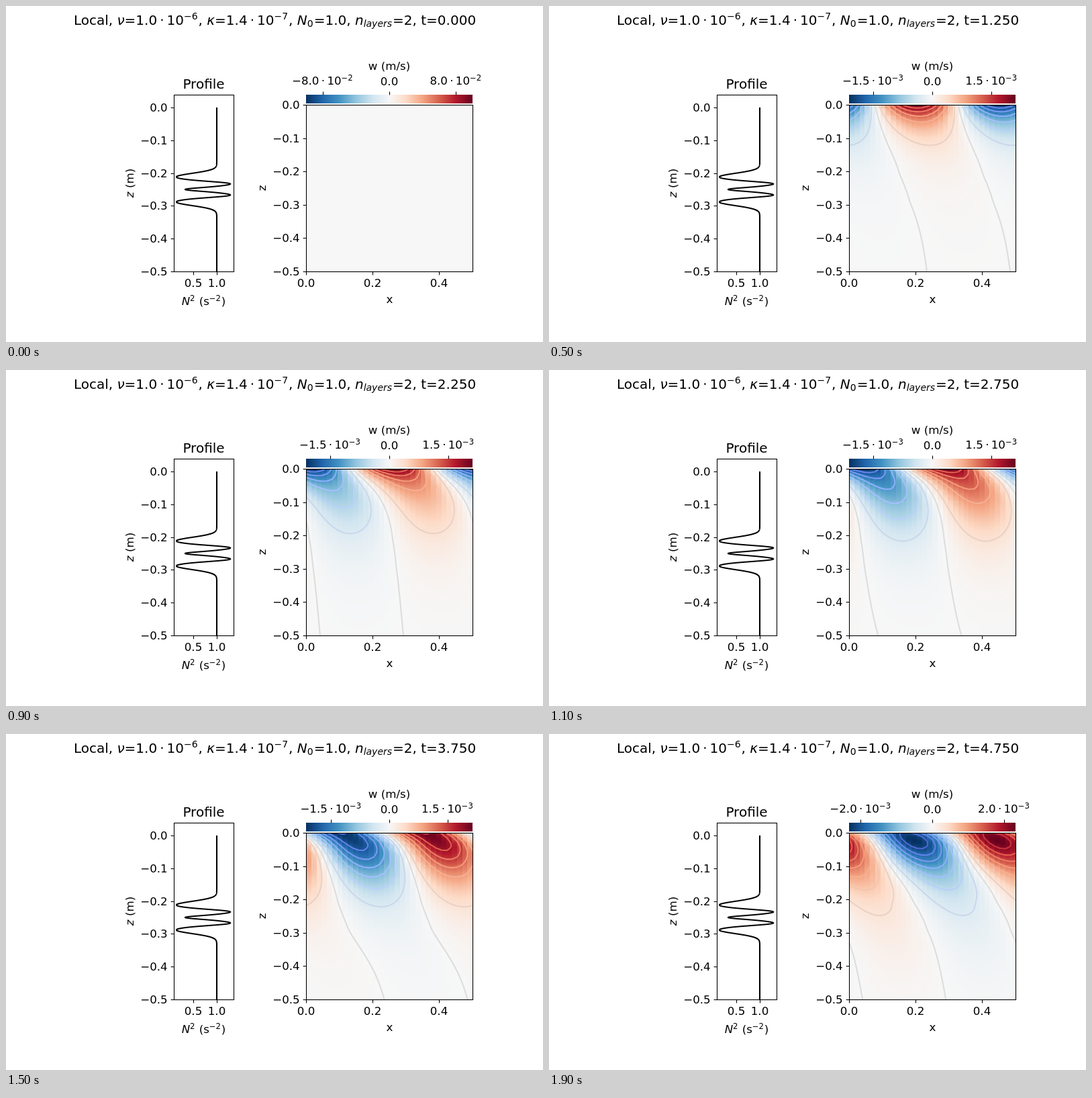
Animation, 800 px wide and 500 px high, one loop 2 s. Source, as an HTML page with a canvas:

```html
<!DOCTYPE html>
<html lang="en">
<head>
<meta charset="utf-8">
<title>Internal wave field</title>
<style>
  html, body { margin: 0; width: 100%; height: 100%; overflow: hidden; background: #fff; }
  canvas { display: block; }
</style>
</head>
<body>
<canvas id="stage" width="800" height="500"></canvas>
<script>
const ctx = document.getElementById('stage').getContext('2d');
const FRAMES = 20, FRAME_MS = 100, FRAME_DT = 0.25;
const K = 4 * Math.PI, OMEGA = 0.78;
const COLS = 32, ROWS = 128;
const MAP = { x: 447, y: 147, size: 248 };
const SMALL = 16.67, LARGE = 20;

const RD_BU = ['053061', '2166ac', '4393c3', '92c5de', 'd1e5f0', 'f7f7f7',
  'fddbc7', 'f4a582', 'd6604d', 'b2182b', '67001f'].map(parseHex);
const COOL_WARM = ['3b4cc0', '6282ea', '8db0fe', 'b8d0f9', 'dddddd',
  'f5c4ad', 'f49a7b', 'de604d', 'b40426'].map(parseHex);

function parseHex(hex) {
  return [0, 2, 4].map(i => parseInt(hex.slice(i, i + 2), 16));
}

function ramp(stops, u) {
  const p = Math.min(1, Math.max(0, u)) * (stops.length - 1);
  const i = Math.min(stops.length - 2, Math.floor(p));
  return stops[i].map((c, j) => Math.round(c + (stops[i + 1][j] - c) * (p - i)));
}

// Squared buoyancy frequency at height z.
function stratification(z) {
  const u = Math.abs(z + 0.25);
  const bump = (centre, width) => Math.exp(-(((u - centre) / width) ** 2));
  return 1 - 0.86 * bump(0.038, 0.016) + 0.46 * bump(0.0185, 0.008) - 0.67 * bump(0, 0.007);
}

// Linear waves below a moving boundary: (D² - k²) W = k² S, with S'' = N² W.
function simulate(forcing) {
  const n = 2 * ROWS, dz = 0.5 / ROWS, perFrame = 25, dt = FRAME_DT / perFrame;
  const n2 = Array.from({ length: n + 1 }, (_, j) => stratification(-j * dz));
  const W = new Float64Array(n + 1), S = new Float64Array(n + 1), V = new Float64Array(n + 1);
  const c = new Float64Array(n + 1), d = new Float64Array(n + 1);
  const diagonal = -2 - (K * dz) ** 2, saved = [];
  for (let step = 0; step < FRAMES * perFrame; step++) {
    c[0] = 0;
    d[0] = forcing(step * dt);
    for (let j = 1; j < n; j++) {
      const pivot = diagonal - c[j - 1];
      c[j] = 1 / pivot;
      d[j] = ((K * dz) ** 2 * S[j] - d[j - 1]) / pivot;
    }
    W[0] = d[0];
    for (let j = n - 1; j > 0; j--) W[j] = d[j] - c[j] * W[j + 1];
    if (step % perFrame === 0) saved.push(W.slice(0, ROWS + 1));
    for (let j = 0; j <= n; j++) {
      V[j] += dt * n2[j] * W[j];
      S[j] += dt * V[j];
    }
  }
  return saved;
}

const inPhase = simulate(t => Math.cos(OMEGA * t));
const quadrature = simulate(t => Math.sin(OMEGA * t));

function peakSpeed(frame) {
  if (frame === 0) return 0.1;
  const late = Math.max(0, frame * FRAME_DT - 3.1) / 1.65;
  return 2.11e-3 + 0.21e-3 * late * late;
}

// Returns w(column, row); the column may be fractional.
function makeField(frame) {
  const a = inPhase[frame], b = quadrature[frame];
  const scale = peakSpeed(frame) / Math.max(...a.map((v, j) => Math.hypot(v, b[j])));
  return (col, row) => {
    const angle = 2 * Math.PI * col / COLS;
    return scale * (a[row] * Math.sin(angle) - b[row] * Math.cos(angle));
  };
}

function renderCells(field, vmax) {
  const cells = document.createElement('canvas');
  cells.width = COLS;
  cells.height = ROWS;
  const g = cells.getContext('2d'), image = g.createImageData(COLS, ROWS);
  for (let r = 0, p = 0; r < ROWS; r++) {
    for (let c = 0; c < COLS; c++, p += 4) {
      const w = field(c + 0.5, r);
      image.data.set([...ramp(RD_BU, 0.5 + w / vmax / 2), 255], p);
    }
  }
  g.putImageData(image, 0, 0);
  return cells;
}

function contourPath(field, level) {
  const path = new Path2D(), dx = MAP.size / COLS, dy = MAP.size / ROWS;
  for (let r = 0; r < ROWS; r++) {
    for (let c = 0; c < COLS; c++) {
      const corners = [[c, r], [c + 1, r], [c + 1, r + 1], [c, r + 1]];
      const values = corners.map(([x, y]) => field(x, y) - level);
      const hits = [];
      for (let i = 0; i < 4; i++) {
        const j = (i + 1) % 4;
        if ((values[i] < 0) === (values[j] < 0)) continue;
        const f = values[i] / (values[i] - values[j]);
        hits.push([0, 1].map(k => corners[i][k] + (corners[j][k] - corners[i][k]) * f));
      }
      hits.forEach(([x, y], i) =>
        path[i % 2 ? 'lineTo' : 'moveTo'](MAP.x + x * dx, MAP.y + y * dy));
    }
  }
  return path;
}

function buildFrame(frame) {
  const vmax = peakSpeed(frame);
  if (frame === 0) return { vmax, cells: renderCells(() => 0, vmax), contours: [] };
  const field = makeField(frame), contours = [];
  for (let i = -7; i <= 7; i++) {
    const color = `rgb(${ramp(COOL_WARM, 0.5 + i / 16)})`;
    contours.push({ color, path: contourPath(field, i * 3e-4) });
  }
  return { vmax, cells: renderCells(field, vmax), contours };
}

const frames = Array.from({ length: FRAMES }, (_, i) => buildFrame(i));

// Markup: ~{italic} ^{superscript} _{subscript}
function text(markup, x, y, size = SMALL, align = 'center') {
  const runs = [...markup.matchAll(/([~^_])\{(.*?)\}|[^~^_{}]+/g)].map(m => {
    const kind = m[1] || '', content = m[2] ?? m[0], script = kind === '^' || kind === '_';
    const italic = kind === '~' || (kind === '_' && /[a-z]/.test(content));
    const font = `${italic ? 'italic ' : ''}${size * (script ? 0.7 : 1)}px "DejaVu Sans", sans-serif`;
    ctx.font = font;
    return {
      content, font,
      width: ctx.measureText(content).width + (script ? 0.05 * size : 0),
      shift: kind === '^' ? -0.383 * size : kind === '_' ? 0.164 * size : 0
    };
  });
  const total = runs.reduce((sum, run) => sum + run.width, 0);
  let left = x - (align === 'center' ? total / 2 : align === 'right' ? total : 0);
  ctx.fillStyle = '#000';
  for (const run of runs) {
    ctx.font = run.font;
    ctx.fillText(run.content, left, y + run.shift);
    left += run.width;
  }
}

function verticalText(markup, x, y) {
  ctx.save();
  ctx.translate(x, y);
  ctx.rotate(-Math.PI / 2);
  text(markup, 0, 0);
  ctx.restore();
}

function line(x1, y1, x2, y2) {
  ctx.beginPath();
  ctx.moveTo(x1, y1);
  ctx.lineTo(x2, y2);
  ctx.stroke();
}

function axes(x, y, w, h, xTicks, yTop, yStep) {
  ctx.strokeStyle = '#000';
  ctx.lineWidth = 1.1;
  ctx.strokeRect(x + 0.5, y + 0.5, w, h);
  for (const [label, tx] of xTicks) {
    line(tx + 0.5, 395.5, tx + 0.5, 400.4);
    text(label, tx, 418);
  }
  for (let i = 0; i < 6; i++) {
    const ty = Math.round(yTop + i * yStep);
    line(x - 4.4, ty + 0.5, x + 0.5, ty + 0.5);
    text((i ? '−' : '') + (i / 10).toFixed(1), x - 9.3, ty + 6, SMALL, 'right');
  }
}

function drawProfile() {
  axes(250, 132, 89, 263, [['0.5', 279], ['1.0', 314]], 151, 48.8);
  text('Profile', 294.5, 123, LARGE);
  text('~{N}^{2} (s^{−2})', 294.5, 445);
  verticalText('~{z} (m)', 190, 263.5);
  ctx.beginPath();
  for (let y = 151; y <= 395; y += 0.25) {
    ctx.lineTo(244 + 70 * stratification((151 - y) / 488), y);
  }
  ctx.lineWidth = 2.08;
  ctx.stroke();
}

function drawColorBar(vmax) {
  const { x, size } = MAP, middle = x + size / 2;
  const gradient = ctx.createLinearGradient(x, 0, x + size, 0);
  RD_BU.forEach((c, i) => gradient.addColorStop(i / 10, `rgb(${c})`));
  ctx.fillStyle = gradient;
  ctx.fillRect(x, 132, size, 13);

  const tick = [1.5e-3, 2e-3, 8e-2].find(v => v >= 2 * vmax / 3);
  const [mantissa, exponent] = tick.toExponential(1).split('e-');
  ctx.strokeStyle = '#000';
  ctx.lineWidth = 1.1;
  for (const sign of [-1, 0, 1]) {
    const tx = middle + sign * tick / vmax * size / 2;
    const snapped = Math.round(tx) + 0.5;
    line(snapped, 127.5, snapped, 132.4);
    const label = sign ? `${mantissa}\u2009·\u200910^{−${exponent}}` : '0.0';
    text((sign < 0 ? '−' : '') + label, tx, sign ? 117 : 118);
  }
  text('w (m/s)', middle, 95);
}

function drawMap({ cells, contours }) {
  const { x, y, size } = MAP;
  ctx.save();
  ctx.beginPath();
  ctx.rect(x, y, size, size);
  ctx.clip();
  ctx.imageSmoothingEnabled = false;
  ctx.drawImage(cells, x, y, size, size);
  ctx.lineWidth = 2.08;
  ctx.lineCap = 'round';
  for (const { color, path } of contours) {
    ctx.strokeStyle = color;
    ctx.stroke(path);
  }
  ctx.restore();
  axes(x, y, size, size, [['0.0', 447], ['0.2', 546], ['0.4', 645]], y, size / 5);
  text('x', x + size / 2 + 0.5, 442);
  verticalText('z', 387, 271);
}

function draw(index) {
  const frame = frames[index];
  ctx.fillStyle = '#fff';
  ctx.fillRect(0, 0, 800, 500);
  const power = (m, e) => `=${m}\u2009·\u200910^{−${e}}, `;
  text('Local, ~{ν}' + power('1.0', 6) + '~{κ}' + power('1.4', 7) +
    '~{N}_{0}=1.0, ~{n}_{layers}=2, t=' + (index * FRAME_DT).toFixed(3), 400.5, 28, LARGE);
  drawProfile();
  drawColorBar(frame.vmax);
  drawMap(frame);
}

const start = performance.now();
let shown = -1;
function animate() {
  const index = Math.floor((performance.now() - start) / FRAME_MS) % FRAMES;
  if (index !== shown) draw(shown = index);
  requestAnimationFrame(animate);
}
animate();
</script>
</body>
</html>
```
